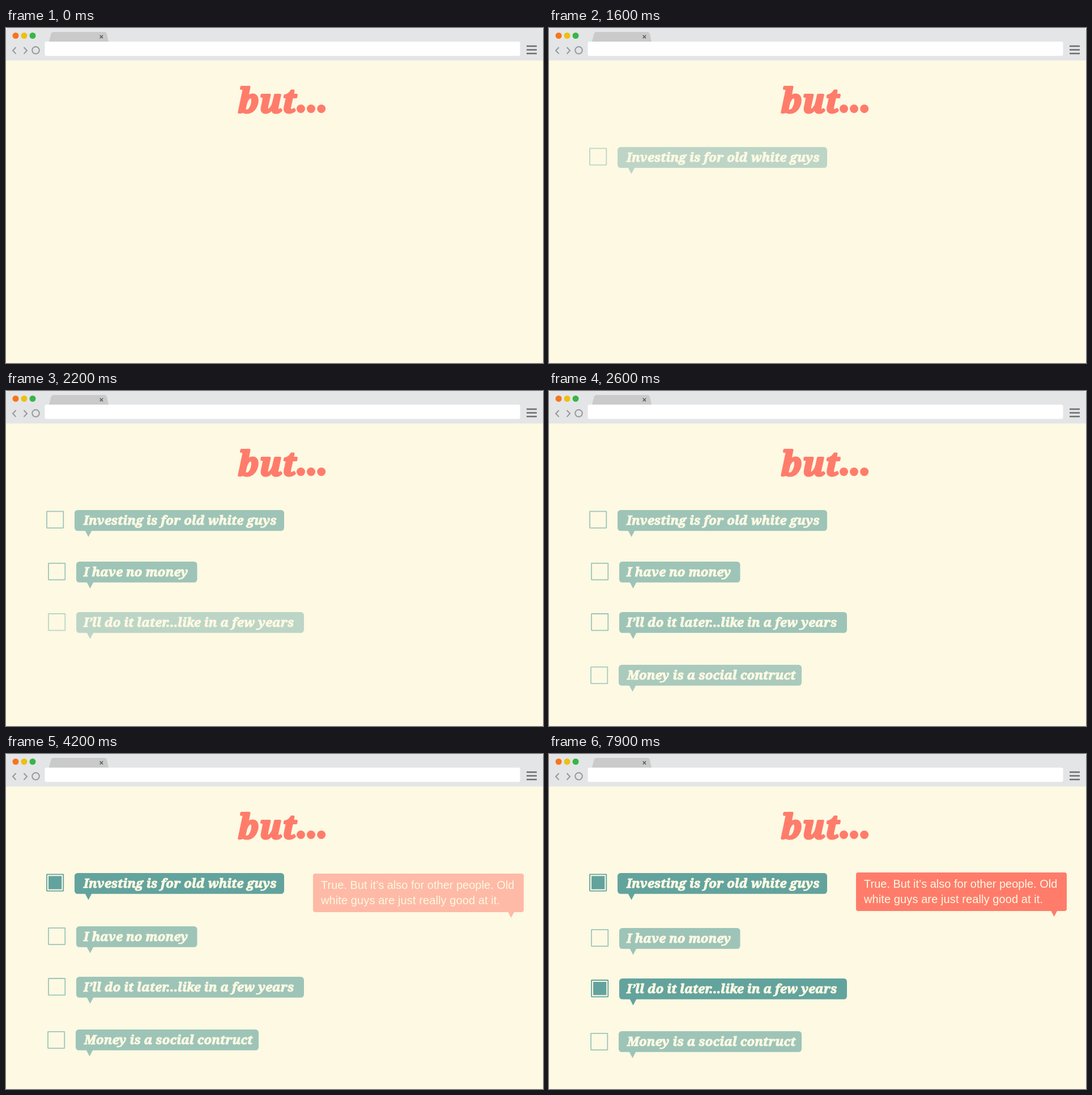
Animation, 948 px wide and 591 px high, one loop 8000 ms. Source, as an HTML page:

```html
<!DOCTYPE html>
<html lang="en">
<head>
<meta charset="utf-8">
<title>but...</title>
<style>
  html, body { margin: 0; width: 100%; height: 100%; overflow: hidden; background: #fff; }
  svg { display: block; width: 948px; height: 591px; }
  .slab { font: italic 700 22px "Noto Serif", serif; letter-spacing: .13px; stroke-width: 1.1; stroke-linejoin: round; }
  .title { font-size: 58px; letter-spacing: 1.5px; stroke-width: 4; fill: #ff7c6b; stroke: #ff7c6b; }
  .cream { fill: #fdf9e3; stroke: #fdf9e3; }
  .teal { fill: #63a39e; }
  .box { fill: none; stroke: #63a39e; stroke-width: 1.8; }
  .icon { fill: none; stroke: #97989a; stroke-width: 2; }
  #reply { fill: #ff7c6b; }
  #reply text { font: 20px "Liberation Sans", Arial, sans-serif; fill: #fdf9e3; }
</style>
</head>
<body>
<svg viewBox="0 0 948 591">
  <path d="M0 591V5Q0 0 5 0H943Q948 0 948 5V591Z" fill="#e4e5e7"/>
  <rect y="57.3" width="948" height="534" fill="#fdf9e3"/>
  <circle cx="17" cy="13.5" r="5.5" fill="#f5761c"/>
  <circle cx="32" cy="13.5" r="5.5" fill="#ecc014"/>
  <circle cx="47" cy="13.5" r="5.5" fill="#39b54a"/>
  <path d="M76 24L79.5 10Q80.5 7 84 7H173.5Q177 7 178 10L181 24Z" fill="#cacacb"/>
  <path d="M165.7 12.8l5.4 5.4m0-5.4l-5.4 5.4" stroke="#58595b" stroke-width="1.5"/>
  <rect x="68.5" y="24" width="839" height="25.3" rx="3" fill="#fff"/>
  <path class="icon" d="M17.5 34L12 39.8L17.5 45.6M31.5 34L37 39.8L31.5 45.6"/>
  <circle class="icon" cx="52.5" cy="39.3" r="6.3"/>
  <path d="M919 32H937M919 38.5H937M919 45H937" stroke="#6b6c6e" stroke-width="2.7"/>

  <text class="slab title" x="410" y="148.5">but</text>
  <g fill="#ff7c6b">
    <circle cx="520.5" cy="142.5" r="7.5"/>
    <circle cx="538.5" cy="142.5" r="7.5"/>
    <circle cx="556.7" cy="142.5" r="7.5"/>
  </g>

  <g id="rows"></g>

  <g id="reply">
    <rect x="542" y="209" width="372" height="68" rx="4"/>
    <path d="M886 276H897.5L891.7 287Z"/>
    <text x="556" y="236">True. But it’s also for other people. Old</text>
    <text x="556" y="263" letter-spacing=".1">white guys are just really good at it.</text>
  </g>
</svg>
<script>
const LOOP = 8000, STEP = 100, MUTED = 0.61;
const rows = [
  { text: 'Investing is for old white guys', x: 121, y: 210, width: 370, gap: 2.3, textX: 137, start: 1300, checked: 3900 },
  { text: 'I have no money', x: 124, y: 301, width: 213.5, gap: 2.8, textX: 137, start: 1600, checked: LOOP },
  { text: 'I’ll do it later...like in a few years', x: 124, y: 390, width: 402, gap: 3, textX: 137, start: 1900, checked: 7900 },
  { text: 'Money is a social contruct', x: 123, y: 483, width: 323, gap: 3.8, textX: 138, start: 2200, checked: LOOP }
];
const reply = document.getElementById('reply');
const list = document.getElementById('rows');
const clamp = v => Math.max(0, Math.min(1, v));

list.innerHTML = rows.map(({ text, x, y, width, gap, textX }) => `
  <g>
    <rect class="box" x="${x - 49}" y="${y + gap}" width="29.3" height="29.3" rx=".5"/>
    <rect class="teal" x="${x - 46}" y="${y + gap + 3}" width="23.3" height="23.3"/>
    <rect class="teal" x="${x}" y="${y}" width="${width}" height="36.8" rx="5.5"/>
    <path class="teal" d="M${x + 18.5} ${y + 36}h12l-6 11.5z"/>
    <text class="slab cream" x="${textX}" y="${y + 26}">${text}</text>
  </g>`).join('');

function draw(t) {
  const slide = clamp((t - 4000) / 400);
  const fadeTime = t < 4100 ? Math.min(t, 2600) : t;   // fading rests until the list moves

  rows.forEach((row, i) => {
    const group = list.children[i];
    const checked = t >= row.checked;
    const shift = i ? 6 * slide : 0;
    group.setAttribute('opacity', checked ? 1 : MUTED * clamp((fadeTime - row.start) / 450));
    group.setAttribute('transform', `translate(0 ${shift})`);
    group.children[1].setAttribute('visibility', checked ? 'visible' : 'hidden');
  });

  reply.setAttribute('opacity', slide);
  reply.setAttribute('transform', `translate(0 ${4 * (1 - slide)})`);
}

const origin = performance.now();
function frame() {
  const t = (performance.now() - origin) % LOOP;
  draw(Math.floor(t / STEP) * STEP);
  requestAnimationFrame(frame);
}
frame();
</script>
</body>
</html>
```
